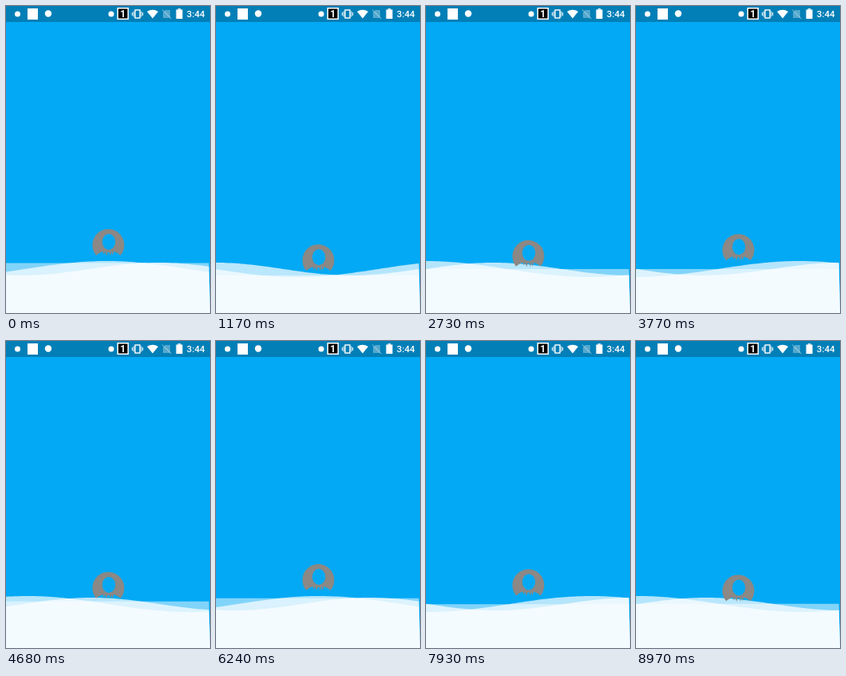
These frames come from a looping animation (256x384 px, 9100 ms). An HTML page with a canvas:

```html
<!DOCTYPE html>
<html>
<head>
<meta charset="utf-8">
<style>
html, body { margin: 0; width: 100%; height: 100%; overflow: hidden; background: #03a9f4; }
canvas { display: block; width: 256px; height: 384px; }
</style>
</head>
<body>
<canvas id="stage"></canvas>
<script>
const W = 256, H = 384, LOOP = 9100, STEP = 130;
const LEVEL = 329;          // resting height of the water
const TURN = 22.44;         // degrees per step
const START = 201;
const RAD = Math.PI / 180;

const canvas = document.getElementById('stage');
const scale = window.devicePixelRatio || 1;
canvas.width = W * scale;
canvas.height = H * scale;
const ctx = canvas.getContext('2d');
ctx.scale(scale, scale);

// Three layers: a level one that only rises and falls, and two travelling waves.
const flat = phase => () => LEVEL + 8 * Math.cos(phase);
const tall = phase => x => LEVEL - 10 * Math.cos(1.25 * Math.PI * x / W - phase + Math.PI / 2);
const low = phase => x => LEVEL - 8 * Math.cos(1.5 * Math.PI * x / W - phase);

function rect(color, x, y, w, h) {
  ctx.fillStyle = color;
  ctx.fillRect(x, y, w, h);
}

function dot(x, y, r) {
  ctx.fillStyle = '#fff';
  ctx.beginPath();
  ctx.arc(x, y, r, 0, 7);
  ctx.fill();
}

function poly(points) {
  ctx.beginPath();
  points.forEach(([x, y]) => ctx.lineTo(x, y));
  ctx.closePath();
}

function label(text, x, y, font, align) {
  ctx.fillStyle = '#fff';
  ctx.font = font;
  ctx.textAlign = align;
  ctx.fillText(text, x, y);
}

function water(height, alpha) {
  const end = 254.6;
  ctx.beginPath();
  ctx.moveTo(0, H);
  for (let x = 0; x < end; x += 4) ctx.lineTo(x, height(x));
  ctx.lineTo(end, height(end));
  ctx.lineTo(W, H);
  ctx.fillStyle = `rgba(255,255,255,${alpha})`;
  ctx.fill();
}

function avatar(x, bottom) {
  ctx.save();
  ctx.translate(x, bottom - 20);
  ctx.beginPath();
  ctx.arc(0, 0, 20, 140 * RAD, 40 * RAD);
  ctx.quadraticCurveTo(11, 9, 7, 8);
  ctx.lineTo(5, 13);
  ctx.lineTo(4, 8);
  ctx.lineTo(2.4, 13.6);
  ctx.lineTo(1.4, 9);
  ctx.lineTo(-1, 9);
  ctx.lineTo(-2.2, 13.6);
  ctx.lineTo(-4, 8);
  ctx.lineTo(-5.5, 12);
  ctx.lineTo(-7, 8);
  ctx.quadraticCurveTo(-11, 9, -15.3, 12.9);
  ctx.closePath();
  ctx.moveTo(8.8, -4);
  ctx.ellipse(0.6, -4, 8.2, 10, 0, 0, 2 * Math.PI);
  ctx.fillStyle = '#8b8885';
  ctx.fill('evenodd');
  ctx.restore();
}

function statusBar() {
  rect('#027fb7', 0, 0, W, 20);
  dot(14.5, 10, 3.5);
  rect('#fff', 27, 3, 13, 14);
  dot(53, 9.5, 4.2);
  dot(132, 10, 3.5);

  // numbered badge
  rect('#fff', 139.5, 2, 14.5, 15);
  rect('#000', 141, 3.5, 11.5, 12);
  label('1', 146.8, 14, 'bold 12px Roboto, sans-serif', 'center');

  // vibrating phone
  ctx.strokeStyle = '#fff';
  ctx.lineWidth = 1.4;
  ctx.strokeRect(162, 5, 6, 10);
  for (const side of [-1, 1]) {
    rect('#fff', 165 + side * 4.8 - 0.5, 6.5, 1, 7);
    rect('#fff', 165 + side * 6.6 - 0.5, 8, 1, 4);
  }

  // signal fan
  ctx.fillStyle = '#fff';
  ctx.beginPath();
  ctx.moveTo(184, 15.5);
  ctx.lineTo(177, 7);
  ctx.quadraticCurveTo(184, 2.5, 191, 7);
  ctx.fill();

  // missing card
  ctx.globalAlpha = 0.32;
  poly([[200, 5], [206, 5], [206, 15], [197, 15], [197, 8]]);
  ctx.fill();
  ctx.lineWidth = 1.2;
  ctx.beginPath();
  ctx.moveTo(196, 4.5);
  ctx.lineTo(207.5, 16);
  ctx.stroke();
  ctx.globalAlpha = 1;

  // battery
  rect('#fff', 213.5, 4.5, 8, 11.5);
  rect('#fff', 215.7, 3.2, 3.6, 1.5);

  label('3:44', 249.5, 14.2, '500 11.5px Roboto, sans-serif', 'right');
}

function draw(time) {
  const step = Math.floor((time % LOOP) / STEP);
  const phase = (START - TURN * step) * RAD;
  rect('#03a9f4', 0, 0, W, H);
  water(flat(phase), 0.5);
  water(tall(phase), 0.7);
  water(low(phase), 0.72);
  avatar(128.4, tall(phase)(W / 2));
  statusBar();
}

const begin = performance.now();
function tick() {
  draw(performance.now() - begin);
  requestAnimationFrame(tick);
}
tick();
</script>
</body>
</html>
```
